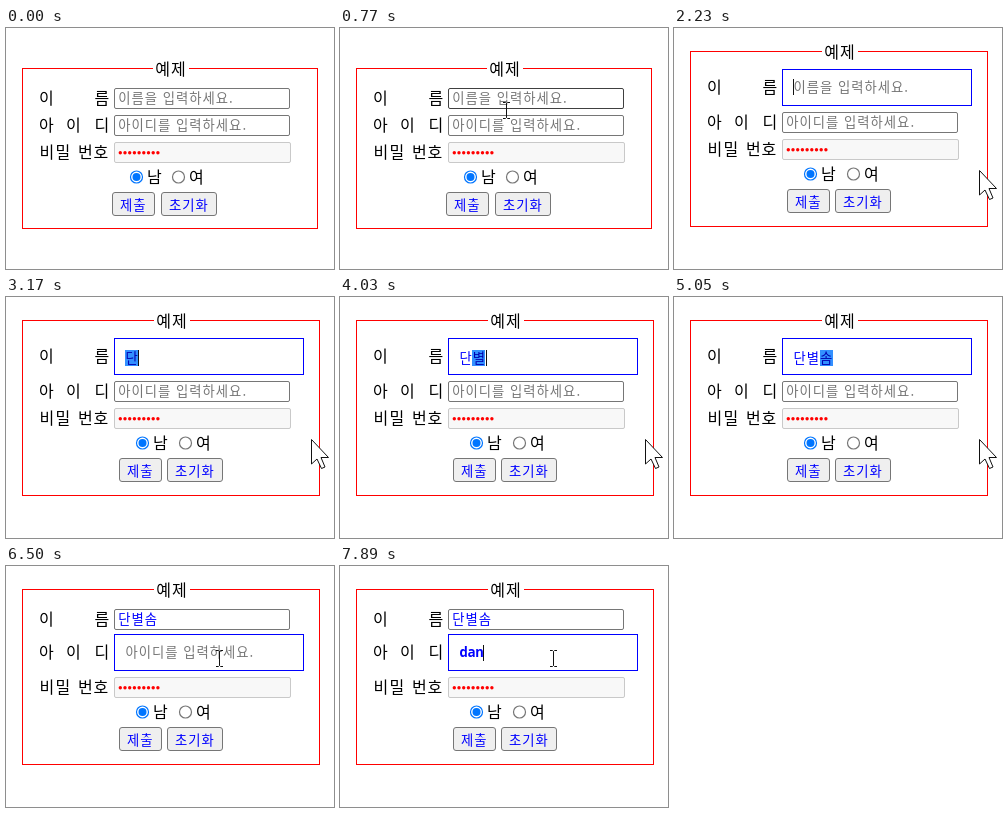
These frames come from a looping animation (328x241 px, 8 s). An HTML page:

```html
<!DOCTYPE html>
<html lang="ko">
<head>
<meta charset="utf-8">
<title>예제</title>
<style>
  html, body { margin: 0; width: 100%; height: 100%; overflow: hidden; background: #fff; }
  svg { display: block; font-family: "Noto Sans CJK KR", "Noto Sans CJK", sans-serif; }
  text { white-space: pre; }
  .label { font-size: 16px; fill: #000; }
  .title { letter-spacing: 1px; }
  .field { font-size: 13.333px; font-weight: 500; letter-spacing: 1px; fill: #00f; }
  .hint { fill: #757575; }
  .latin { font-family: "Noto Sans Mono", monospace; font-weight: 600; letter-spacing: 0; }
  .compose { fill: #0000b0; }
  .solid { shape-rendering: crispEdges; }
</style>
</head>
<body>
<svg id="stage" width="328" height="241" viewBox="0 0 328 241"></svg>
<script>
const LOOP = 8000;
const FIELD_X = 108, TYPE_X = 119, ADVANCE = 13.27, LATIN_ADVANCE = 8;
const RED = '#f00', GRAY = '#767676';

// Page layout for each focus state
const LAYOUTS = [
  { from: 0, focus: -1, top: 40, right: 312, bottom: 201, rows: [60, 87, 114], shift: 0, foot: 149 },
  { from: 1160, focus: 0, top: 23, right: 314, bottom: 199, rows: [41, 84, 111], shift: 6.5, foot: 146 },
  { from: 5960, focus: 1, top: 23, right: 314, bottom: 199, rows: [43, 68, 111], shift: 6.5, foot: 146 }
];

// Pointer steps: time, x, y
const POINTER = [
  [70, 268, 222], [150, 264, 196], [230, 256, 170], [300, 244, 146],
  [380, 228, 126], [460, 210, 111], [540, 192, 106], [610, 176, 103],
  [770, 166, 82], [850, 165, 77], [930, 164, 74], [1000, 164, 72],
  [1390, 185, 79], [1460, 250, 113], [1540, 290, 134], [1610, 305, 142],
  [5350, 301, 139], [5430, 289, 131], [5510, 271, 120], [5580, 253, 110],
  [5660, 238, 101], [5740, 227, 97], [5810, 222, 95], [5890, 220, 94],
  [6120, 218, 93], [6190, 215, 92], [6270, 213, 92]
].map(([from, x, y]) => ({ from, x, y }));

const CLICKS = [[1160, 1390, 164, 72], [5960, 6190, 218, 93]];

// Syllable input: time, finished text, syllable being composed
const NAME = [
  [0, '', ''], [2550, '', 'ㄷ'], [2930, '', '다'], [3170, '', '단'],
  [3640, '단', 'ㅂ'], [3870, '단', '벼'], [4030, '단', '별'],
  [4110, '단별', 'ㅅ'], [4420, '단별', '소'], [4500, '단별', '솜'],
  [5960, '단별솜', '']
].map(([from, done, open]) => ({ from, done, open }));

const ID = [[0, ''], [7430, 'd'], [7670, 'da'], [7890, 'dan']]
  .map(([from, done]) => ({ from, done, open: '' }));

const CARET_OFF = [[1770, 2230], [5050, 5600], [6500, 7050]];

const at = (steps, t) => steps.filter(s => s.from <= t).pop();
const within = (t, [a, b]) => t >= a && t < b;

const fill = (x, y, w, h, color) =>
  `<rect class="solid" x="${x}" y="${y}" width="${w}" height="${h}" fill="${color}"/>`;
const box = (x, y, w, h, stroke, color = '#fff', r = 0) =>
  `<rect x="${x + .5}" y="${y + .5}" width="${w - 1}" height="${h - 1}" rx="${r}" fill="${color}" stroke="${stroke}"/>`;
const disc = (x, y, r, color, more = '') =>
  `<circle cx="${x}" cy="${y}" r="${r}" fill="${color}" ${more}/>`;
const text = (x, y, body, kind, more = '') =>
  `<text class="${kind}" x="${x}" y="${y}" ${more}>${body}</text>`;

function hitRow(layout, p) {
  if (!p) return -1;
  return [0, 1].find(i => {
    const big = layout.focus === i, y = p.y - 3 - layout.rows[i];
    return p.x >= FIELD_X && p.x < FIELD_X + (big ? 190 : 176) && y >= 0 && y < (big ? 37 : 21);
  }) ?? -1;
}

function inputField(i, layout, hover, entry, hint, t) {
  const y = layout.rows[i], focused = layout.focus === i;
  const value = entry.done + entry.open;
  const h = focused ? 37 : 21;
  const x = focused ? TYPE_X + .5 : 112.3;
  const drop = focused && i === 0 && value ? 1.5 : 0;
  const base = y + h / 2 + 4.8 + drop;
  let out = focused
    ? box(FIELD_X, y, 190, h, '#00f')
    : box(FIELD_X, y, 176, h, hover ? '#404040' : GRAY, '#fff', 1.5);

  const lineY = i ? y + 11 : y + (value ? 12 : 10);
  if (entry.open) {
    const left = Math.round(TYPE_X + ADVANCE * entry.done.length);
    out += fill(left, lineY, 13, 16, '#3390ff');
  }
  if (value) {
    const open = entry.open && `<tspan class="compose">${entry.open}</tspan>`;
    out += text(x, base, entry.done + open, i ? 'field latin' : 'field');
  } else {
    out += text(x, base, hint, 'field hint');
  }
  if (focused && !CARET_OFF.some(span => within(t, span))) {
    const step = i ? LATIN_ADVANCE : ADVANCE;
    out += fill(Math.round(TYPE_X + step * value.length), lineY, 1, 16, '#111');
  }
  return out;
}

function password(y) {
  let out = box(FIELD_X, y, 177, 21, '#c9c9c9', '#f8f8f8', 1.5);
  for (let i = 0; i < 9; i++) out += disc(114.3 + 4.7 * i, y + 10.8, 1.7, RED);
  return out;
}

function labels(layout) {
  const mid = i => layout.rows[i] + (layout.focus === i ? 18.5 : 10.5) + 5.8;
  return text('33 88.5', mid(0), '이름', 'label')
    + text('33 60 88.5', mid(1), '아이디', 'label')
    + text('33.5 49.5 72 87.5', mid(2), '비밀번호', 'label');
}

function radio(x, y, name, checked) {
  const color = checked ? '#0075ff' : GRAY;
  return disc(x, y, 6, '#fff', `stroke-width="1.2" stroke="${color}"`)
    + (checked ? disc(x, y, 4, color) : '')
    + text(x + 10.6, y + 6, name, 'label');
}

function button(x, y, w, name) {
  return box(x, y, w, 24, GRAY, '#efefef', 2.5) + text(x + 8, y + 17.5, name, 'field');
}

function footer({ shift, foot }) {
  const low = Math.floor(shift), high = Math.ceil(shift);
  return radio(130.5 + low, foot, '남', true)
    + radio(172.5 + high, foot, '여', false)
    + button(106 + high, foot + 15, 43, '제출')
    + button(155 + low, foot + 15, 56, '초기화');
}

function frameBox({ top, right, bottom }) {
  const mid = (16 + right) / 2;
  return box(16, top, right - 16, bottom - top, RED)
    + fill(mid - 17, top - 1, 36, 3, '#fff')
    + text(mid + 1, top + 6.6, '예제', 'label title', 'text-anchor="middle"');
}

function cursor(p, beam) {
  if (!p) return '';
  const path = beam
    ? 'M-3.5-8H-1L0-7L1-8H3.5M0-7V7M-3.5 8H-1L0 7L1 8H3.5'
    : 'M.5.5V25L6 20L10.5 29.5L14 28L10 18.5H17.5Z';
  const look = beam ? 'fill="none"' : 'fill="#fff"';
  const nudge = beam ? .5 : 0;
  return `<path transform="translate(${p.x + nudge} ${p.y + nudge})" d="${path}" stroke="#111" ${look}/>`;
}

function scene(t) {
  const layout = at(LAYOUTS, t), p = at(POINTER, t), row = hitRow(layout, p);
  const click = CLICKS.find(c => within(t, c));
  return frameBox(layout) + labels(layout)
    + inputField(0, layout, row === 0, at(NAME, t), '이름을 입력하세요.', t)
    + inputField(1, layout, row === 1, at(ID, t), '아이디를 입력하세요.', t)
    + password(layout.rows[2]) + footer(layout)
    + (click ? disc(click[2], click[3], 11.5, '#f4e535', 'opacity=".62"') : '')
    + cursor(p, row >= 0);
}

const stage = document.getElementById('stage');
const start = performance.now();
let shown = '';

function tick() {
  const next = scene((performance.now() - start) % LOOP);
  if (next !== shown) stage.innerHTML = shown = next;
  requestAnimationFrame(tick);
}
tick();
</script>
</body>
</html>
```
